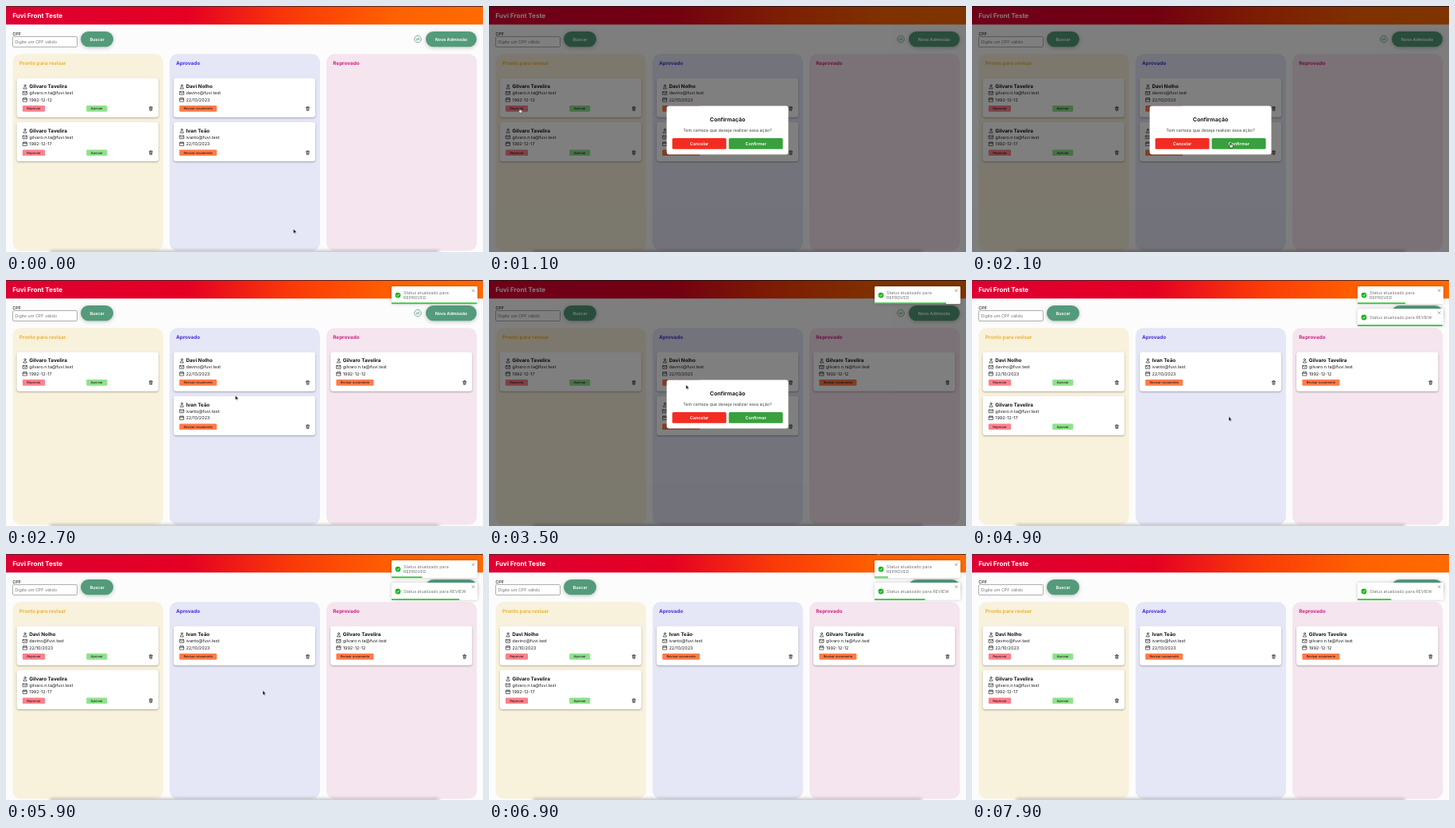
Animation of 600x309 px, one loop 8000 ms. Source, as an HTML page:

```html
<!DOCTYPE html>
<html lang="pt-BR">
<head>
<meta charset="utf-8">
<title>Front Teste</title>
<style>
  html, body { margin: 0; width: 100%; height: 100%; overflow: hidden; background: #fcfcfc; }
  svg { display: block; width: 100%; height: 100%; }
  text { font-family: Inter, sans-serif; text-rendering: geometricPrecision; }
  .line { fill: none; stroke: #222; stroke-width: .65; stroke-linecap: round; stroke-linejoin: round; }
  .soft { filter: drop-shadow(0 1px 1.1px rgba(0, 0, 0, .3)); }
  .glow { filter: drop-shadow(0 1.5px 2.5px rgba(0, 0, 0, .25)); }
  .toast rect:first-child { filter: drop-shadow(0 .4px 2px rgba(0, 0, 0, .2)); }
</style>
</head>
<body>
<svg id="stage" viewBox="0 0 600 309" preserveAspectRatio="none">
  <defs>
    <linearGradient id="brand">
      <stop offset="0" stop-color="#dd0033"/>
      <stop offset=".38" stop-color="#e50023"/>
      <stop offset=".6" stop-color="#fa3a08"/>
      <stop offset=".82" stop-color="#ff6200"/>
      <stop offset="1" stop-color="#ff6a00"/>
    </linearGradient>
    <filter id="blur" x="-10%" y="-300%" width="120%" height="700%"><feGaussianBlur stdDeviation="2"/></filter>
  </defs>
</svg>
<script>
const LOOP = 8000, STEP = 100;
const SWAP1 = 2250, SWAP2 = 4350;
const stage = document.getElementById('stage');
const tracks = [];

// Markup helpers
const text = (x, y, size, fill, str, weight = 400, anchor = 'start') =>
  `<text x="${x}" y="${y}" font-size="${size}" fill="${fill}" font-weight="${weight}" text-anchor="${anchor}">${str}</text>`;
const box = (x, y, w, h, r, fill, extra = '') =>
  `<rect x="${x}" y="${y}" width="${w}" height="${h}" rx="${r}" fill="${fill}" ${extra}/>`;
const line = (d, extra = '') => `<path class="line" d="${d}" ${extra}/>`;
const button = (x, y, w, h, r, fill, label, size, color, weight, extra) =>
  box(x, y, w, h, r, fill, extra) + text(x + w / 2, y + h / 2 + size * .36, size, color, label, weight, 'middle');

function add(markup, parent = stage) {
  const g = document.createElementNS('http://www.w3.org/2000/svg', 'g');
  g.innerHTML = markup;
  return parent.appendChild(g);
}

// Timeline helpers: steps are [time, properties, easing]
function track(el, steps) {
  const frames = steps.map(([t, props, easing = 'linear']) => ({ ...props, easing, offset: t / LOOP }));
  if (frames[0].offset > 0) frames.unshift({ ...frames[0], easing: 'step-end', offset: 0 });
  const last = frames[frames.length - 1];
  if (last.offset < 1) frames.push({ ...last, offset: 1 });
  const anim = el.animate(frames, { duration: LOOP, fill: 'both' });
  anim.pause();
  tracks.push(anim);
}
function show(el, ...spans) {
  const steps = [[0, { opacity: spans[0][0] === 0 ? 1 : 0 }, 'step-end']];
  for (const [from, to] of spans) {
    if (from > 0) steps.push([from, { opacity: 1 }, 'step-end']);
    if (to < LOOP) steps.push([to, { opacity: 0 }, 'step-end']);
  }
  track(el, steps);
}

// Page
const GREEN = '#539b7b';
add(
  box(0, 0, 600, 309, 0, '#fcfcfc') +
  box(0, 0, 600, 23.3, 0, 'url(#brand)') +
  box(0, 0, 600, .9, 0, '#4a2226') +
  text(8.3, 15.4, 8.1, '#fff', 'Fuvi Front Teste', 700) +
  text(8.3, 37, 5.4, '#222', 'CPF', 500) +
  box(8.5, 38.5, 81, 13, 1.3, '#fff', 'stroke="#8d8d8d" stroke-width=".7"') +
  text(11.3, 46.9, 5.4, '#757575', 'Digite um CPF válido') +
  button(94, 32, 41, 19.3, 9.65, GREEN, 'Buscar', 5.4, '#fff', 600, 'class="glow"') +
  button(528, 32, 64, 19.3, 9.65, GREEN, 'Nova Admissão', 5.4, '#fff', 600, 'class="glow"') +
  `<circle cx="518" cy="41.6" r="4.3" fill="none" stroke="${GREEN}" stroke-width=".8"/>` +
  line('M515.8 41h4.2l-1.1-1.2M520.2 42.4h-4.2l1.1 1.2', `style="stroke:${GREEN}"`)
);

[
  ['Pronto para revisar', '#f8f1dc', '#efb433'],
  ['Aprovado', '#e5e6f6', '#4130d9'],
  ['Reprovado', '#f5e5ee', '#cf2283'],
].forEach(([title, fill, color], i) => {
  const x = 8.4 + i * 197.3;
  add(box(x, 60.3, 189.2, 247.2, 10, fill) + text(x + 8.3, 74.4, 6.32, color, title, 700));
});

// Cards
const ICONS =
  `<circle class="line" cx="10.4" cy="9.5" r="1.1"/>` +
  line('M8.3 13.2c0-2.7 4.2-2.7 4.2 0z') +
  line('M7.9 17.1h5v3.8h-5zM7.9 17.4l2.5 2 2.5-2') +
  line('M8 25.5h4.8v4.2h-4.8zM8 26.9h4.8M9.2 24.8v.8M11.6 24.8v.8') +
  line('M166.6 37h4.2M167.9 36.8v-.8h1.6v.8M167.1 37.3l.3 3.6h2.6l.3-3.6M168.2 38.3v1.5M169.2 38.3v1.5');

function card([name, mail, date], col, row, from, to) {
  const small = (x, w, fill, label) => button(x, 34.6, w, 7.7, 1.2, fill, label, 4, '#2a1a1a', 500);
  const actions = col === 0
    ? small(7.3, 28.2, '#fb828c', 'Reprovar') + small(87.7, 26, '#8fe28d', 'Aprovar')
    : small(7.3, 47, '#ff7b48', 'Revisar novamente');
  const g = add(`<g transform="translate(${13.5 + col * 197.3} ${90.4 + row * 55.4})">` +
    box(0, 0, 178.3, 49.3, 3, '#fff', 'class="soft"') + ICONS +
    text(15.7, 12.8, 6.32, '#111', name, 700) +
    text(15.7, 21, 5.5, '#222', mail, 400) +
    text(15.7, 29.2, 5.5, '#222', date, 400) + actions + '</g>');
  show(g, [from, to]);
}

const gil = ['Gilvaro Tavelira', 'gilvaro.n.ta@fuvi.test'];
const first = [...gil, '1992-12-12'], second = [...gil, '1992-12-17'];
const davi = ['Davi Nolho', 'davino@fuvi.test', '22/10/2023'];
const ivan = ['Ivan Teão', 'ivanto@fuvi.test', '22/10/2023'];
[
  [first, 0, 0, 0, SWAP1], [first, 2, 0, SWAP1, LOOP],
  [second, 0, 1, 0, SWAP1], [second, 0, 0, SWAP1, SWAP2], [second, 0, 1, SWAP2, LOOP],
  [davi, 1, 0, 0, SWAP2], [davi, 0, 0, SWAP2, LOOP],
  [ivan, 1, 1, 0, SWAP2], [ivan, 1, 0, SWAP2, LOOP],
].forEach(args => card(...args));

// Soft shade along the lower edge
add(box(55, 307.5, 490, 4, 2, '#000', 'opacity=".3" filter="url(#blur)"'));

// Confirmation dialog
const modal = add(
  box(0, 0, 600, 309, 0, 'rgba(0,0,0,.5)') +
  box(223.5, 125.6, 153, 60.8, 3, '#fff') +
  text(300, 145, 7, '#1c1c1c', 'Confirmação', 700, 'middle') +
  text(300, 157.9, 5.4, '#444', 'Tem certeza que deseja realizar essa ação?', 400, 'middle') +
  button(230.5, 166, 68, 13.8, 1.6, '#f32c21', 'Cancelar', 5.4, '#fff', 600) +
  button(301.6, 166, 68, 13.8, 1.6, '#38a03d', 'Confirmar', 5.4, '#fff', 600)
);
show(modal, [950, SWAP1], [3250, SWAP2]);

// Toasts: bounce in for 700 ms, count down for 5000 ms, bounce out
function toast(y, lines, mount) {
  const start = mount + 700, end = start + 5000;
  const slide = x => ({ transform: `translateX(${x}px)` });
  const ease = 'cubic-bezier(.215,.61,.355,1)';
  const rows = lines.map((s, i) =>
    text(15, 12.9 + (i - (lines.length - 1) / 2) * 6.5, 5.4, '#757575', s)).join('');
  const g = add(`<g class="toast" transform="translate(485 ${y})">` +
    box(0, 0, 108, 21.8, 1.4, '#fff') +
    '<circle cx="8" cy="11" r="3.4" fill="#16b51c"/>' +
    '<path d="M6.3 11.1l1.2 1.2 2.3-2.7" fill="none" stroke="#fff" stroke-width=".8"/>' + rows +
    line('M101.3 3.8l2.8 2.8M104.1 3.8l-2.8 2.8', 'style="stroke:#777"') +
    box(0, 20.2, 108, 1.7, .5, '#2fc435', 'class="bar"') + '</g>');
  const steps = [
    [mount, slide(1012), ease], [mount + 420, slide(-8.4), ease], [mount + 525, slide(3.4), ease],
    [mount + 630, slide(-1.7), ease], [start, slide(0)],
  ];
  if (end < LOOP) steps.push([end, slide(0), ease], [end + 140, slide(-6.8), ease], [LOOP, slide(400)]);
  track(g, steps);
  const left = Math.max(0, (end - LOOP) / 5000);
  track(g.querySelector('.bar'), [
    [start, { transform: 'scaleX(1)' }],
    [Math.min(end, LOOP), { transform: `scaleX(${left})` }],
  ]);
}
toast(8.1, ['Status atualizado para', 'REPROVED'], 1980);
toast(36, ['Status atualizado para REVIEW'], 4150);

// Pointer
const pointer = add('');
const arrow = add('<path d="M0 0V5.6L1.3 4.5 2.1 6.3 3 5.9 2.2 4.2H4Z" fill="#000" stroke="#fff" stroke-width=".45"/>', pointer);
const hand = add('<path d="M-.5.4Q0-.3.5.4V2.2L3 2.8Q3.5 3 3.4 3.8L2.8 6H-.2L-1.9 3.6Q-1.7 2.9-.5 3.7Z" fill="#fff" stroke="#000" stroke-width=".5"/>', pointer);
const HANDS = [[750, 1350], [1750, 2250], [2950, 3450], [4050, 4400]];
show(hand, ...HANDS);
show(arrow, [0, 750], [1350, 1750], [2250, 2950], [3450, 4050], [4400, LOOP]);
track(pointer, [
  [0, 361.5, 280], [100, 359, 278], [200, 352, 273], [300, 352, 273, 'ease-in-out'],
  [800, 40, 129], [1000, 38.5, 128.3], [1250, 38.5, 128.3, 'ease-in-out'],
  [1850, 325, 172], [2250, 325, 172, 'ease-in'], [2700, 288.5, 145, 'ease-out'],
  [3050, 241, 128], [3350, 241, 128, 'ease-in-out'], [4100, 323, 171.5],
  [6500, 323, 171.5, 'ease-in-out'], [6900, 488.5, -5], [7000, 492, -12],
].map(([t, x, y, easing]) => [t, { transform: `translate(${x}px, ${y}px)` }, easing]));

function render(now) {
  const t = Math.floor(now % LOOP / STEP) * STEP;
  for (const anim of tracks) anim.currentTime = t;
  requestAnimationFrame(render);
}
render(0);
</script>
</body>
</html>
```
